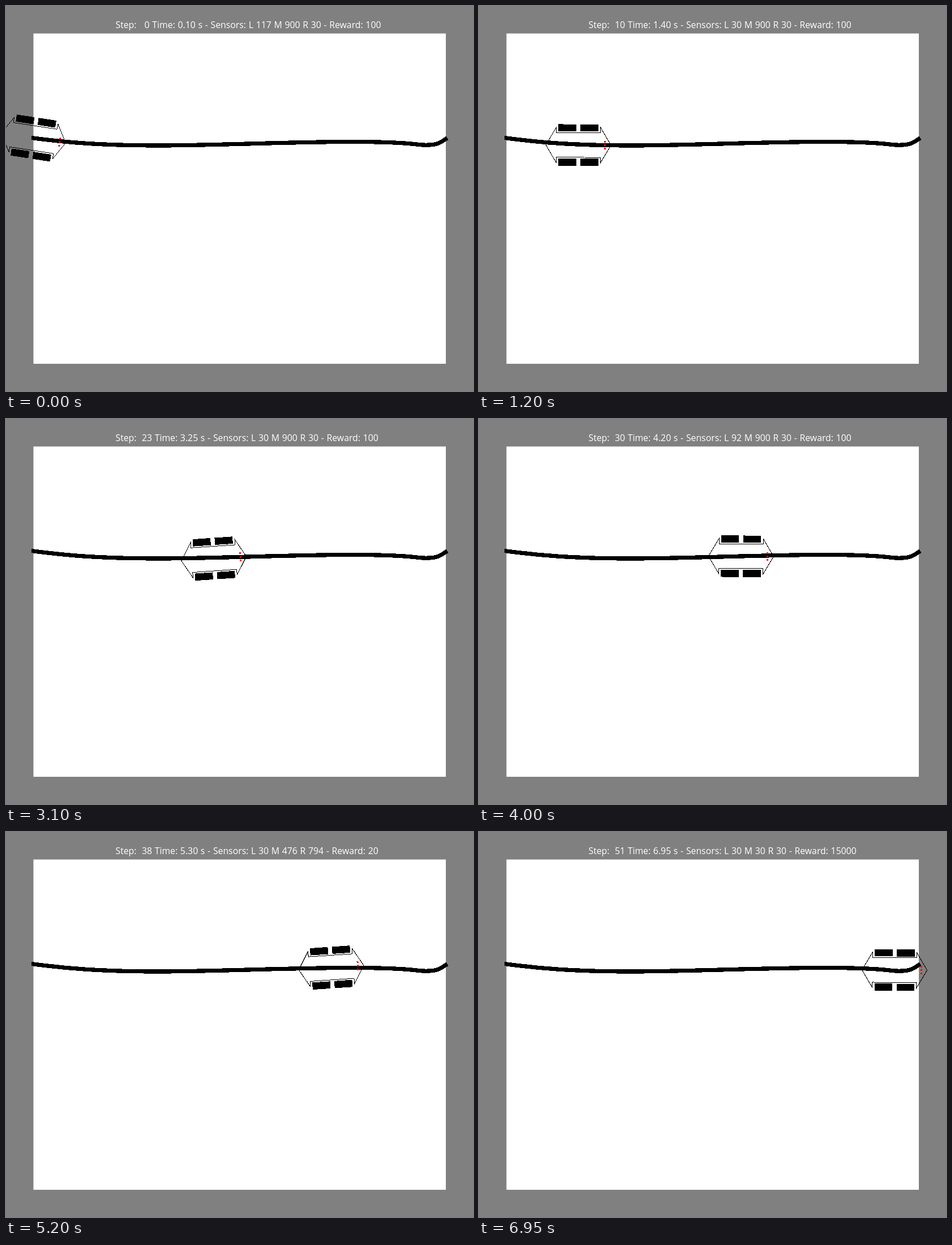
Recreate the animation shown at these times as an HTML page. Size 825 px wide and 679 px high, loop 7.1 s.

```html
<!DOCTYPE html>
<html lang="en">
<head>
<meta charset="utf-8">
<title>Line follower</title>
<style>
  html, body { margin: 0; width: 100%; height: 100%; overflow: hidden; background: #808080; }
  svg { display: block; width: 825px; height: 679px; }
  text { font: 15.8px "Open Sans", "Noto Sans", sans-serif; word-spacing: .6px; white-space: pre; fill: #fff; }
</style>
</head>
<body>
<svg viewBox="0 0 825 679">
  <rect width="825" height="679" fill="#808080"/>
  <rect x="48.5" y="48.5" width="728.5" height="582.5" fill="#fff"/>
  <text id="status" x="193.5" y="39"></text>
  <path id="track" fill="none" stroke="#000" stroke-width="7.3" shape-rendering="crispEdges"
    d="M45 232.5C107 240.9 170 246 270 246S500 239.5 610 239.5 722 245.2 742 245.2 766 242 779.5 232.8"/>
  <g id="car" shape-rendering="crispEdges">
    <path fill="none" stroke="#000" d="M57.5 0 39-31.3V-21.7H-39V-31.3L-57.5 0-39 31.3V21.7H39V31.3Z"/>
    <path id="wheels"/>
    <path id="sensors" fill="#f00"/>
  </g>
</svg>
<script>
const LOOP = 7100, LAST = 51, STRIDE = 15.97, TURN = 4.2;
const SENSOR_X = 47, SENSOR_GAP = 6.2;
const LEFT_TURNS = [3, 10, 23, 35, 50], RIGHT_TURNS = [28, 39, 46];
const FAST_RUNS = [[0, 5], [21, 24], [44, 47]];

const byId = id => document.getElementById(id);
const track = byId("track");
const trackLength = track.getTotalLength();
const trackEnd = track.getPointAtLength(trackLength).x;

const delay = n => FAST_RUNS.some(([a, b]) => n >= a && n <= b) ? 100 : 150;
const turnAt = n => RIGHT_TURNS.includes(n) - LEFT_TURNS.includes(n);
const box = (cx, cy, w, h) => `M${cx - w / 2} ${cy - h / 2}h${w}v${h}h${-w}z`;

function trackY(x) {
  if (x > trackEnd) return Infinity;
  let low = 0, high = trackLength;
  while (high - low > 0.05) {
    const mid = (low + high) / 2;
    if (track.getPointAtLength(mid).x < x) low = mid;
    else high = mid;
  }
  return track.getPointAtLength(low).y;
}

// Left, middle and right brightness: 30 off the line, 900 fully on it.
function sense({ x, y, heading }) {
  const a = heading * Math.PI / 180, sin = Math.sin(a), cos = Math.cos(a);
  return [-1, 0, 1].map(side => {
    const off = side * SENSOR_GAP;
    const sx = x + SENSOR_X * cos - off * sin;
    const sy = y + SENSOR_X * sin + off * cos;
    const cover = (4.9 - Math.abs(sy - trackY(sx))) / 2.6;
    return Math.round(30 + 870 * Math.min(1, Math.max(0, cover)));
  });
}

function simulate() {
  const steps = [];
  const car = { x: 48.5, y: 232.9, heading: 8.7, clock: 0.1 };
  let start = 0;
  for (let n = 0; n <= LAST; n++) {
    const turn = turnAt(n);
    if (turn) {
      car.heading += turn * TURN;
      car.clock += 0.05;
    } else if (n) {
      const a = car.heading * Math.PI / 180;
      car.x += STRIDE * Math.cos(a);
      car.y += STRIDE * Math.sin(a);
      car.clock += 0.15;
    }
    const [l, m, r] = sense(car);
    const reward = n === LAST ? 15000 : m === 900 ? 100 : 20;
    const label = `Step: ${String(n).padStart(3)} Time: ${car.clock.toFixed(2)} s - ` +
      `Sensors: L ${l} M ${m} R ${r} - Reward: ${reward}`;
    steps.push({ ...car, start, label });
    start += delay(n);
  }
  return steps;
}

const sides = [-1, 1];
byId("wheels").setAttribute("d",
  sides.flatMap(i => sides.map(j => box(i * 19.5, j * 30.3, 31.6, 12.6))).join(""));
byId("sensors").setAttribute("d",
  [-1, 0, 1].map(i => box(SENSOR_X, i * SENSOR_GAP, 3, 3)).join(""));

const steps = simulate();

function render(ms) {
  const s = steps.findLast(step => step.start <= ms);
  byId("status").textContent = s.label;
  byId("car").setAttribute("transform",
    `translate(${s.x.toFixed(2)} ${s.y.toFixed(2)}) rotate(${s.heading.toFixed(2)})`);
}

const begin = performance.now();
function tick() {
  render(Math.max(0, performance.now() - begin) % LOOP);
  requestAnimationFrame(tick);
}
tick();
</script>
</body>
</html>
```
